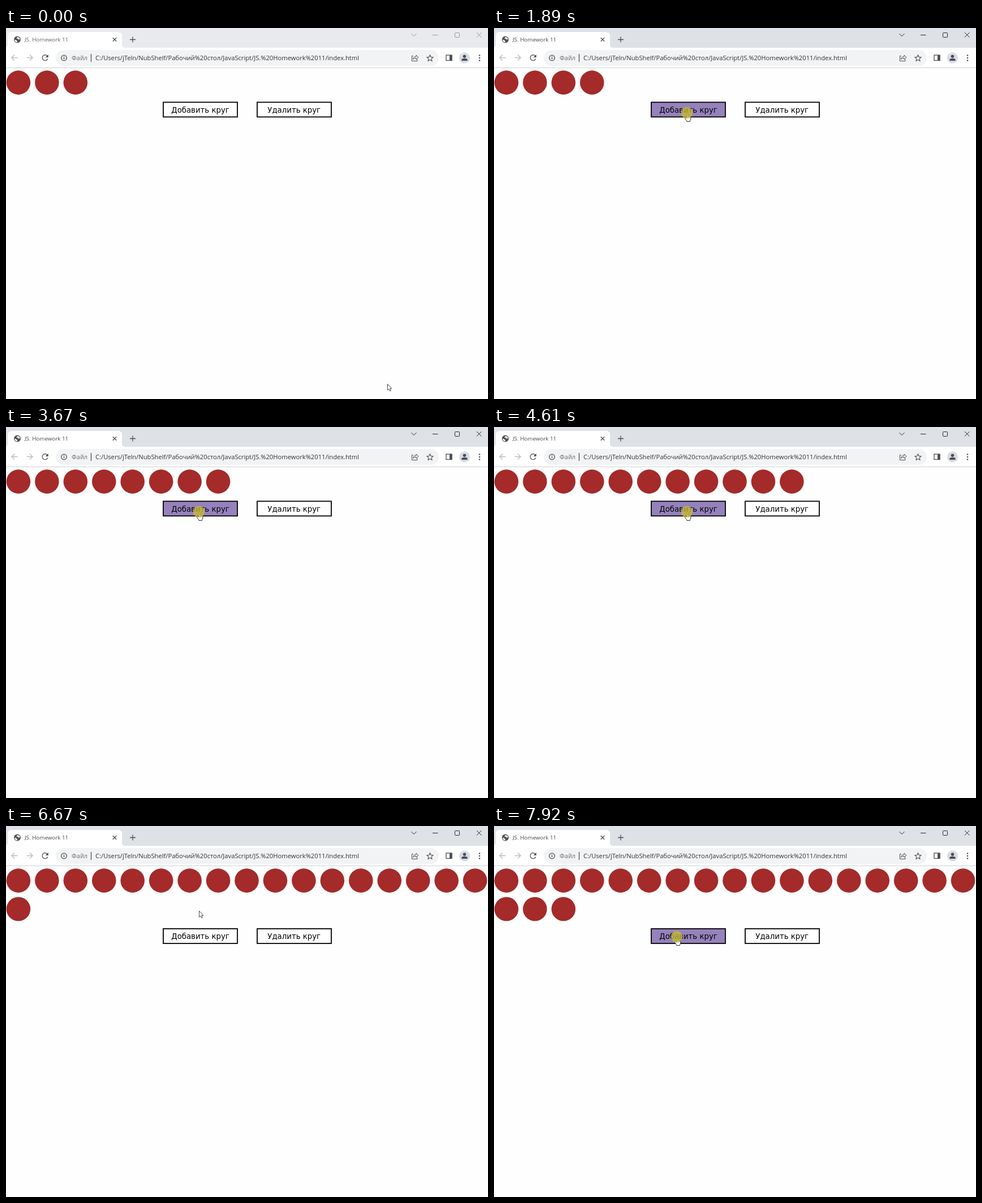
Animation, 852 px wide and 657 px high, one loop 7.99 s. Source, as an HTML page:

```html
<!DOCTYPE html>
<html lang="ru">
<head>
<meta charset="utf-8">
<title>JS. Homework 11</title>
<style>
  html, body { margin: 0; width: 100%; height: 100%; overflow: hidden; background: #fefefe; }
  svg { display: block; width: 852px; height: 657px; }
  text { font-family: "Open Sans", "Noto Sans", sans-serif; fill: #303236; white-space: pre; }
  .line { fill: none; stroke: #4b4e53; stroke-width: 1.3; }
  .pale { stroke: #b9bbbf; }
  .bar { fill: #dee1e6; }
  .win { fill: none; stroke: #25272a; stroke-width: 1; }
  .tab { font-size: 9.8px; fill: #45484d; }
  .inactive .bar { fill: #e8eaed; }
  .inactive .win { stroke: #96989c; }
  .inactive .tab { fill: #62656a; }
  .btn rect { fill: #fff; stroke: #000; stroke-width: 1.8; }
  .btn text { font: 13.3px "DejaVu Sans", Verdana, sans-serif; fill: #000; text-anchor: middle; }
  .btn.hover rect { fill: #9582bd; }
  #dots { fill: #a52a2a; }
</style>
</head>
<body>
<svg id="stage" viewBox="0 0 852 657">
  <rect width="852" height="657" fill="#fefefe"/>

  <!-- title bar -->
  <rect class="bar" width="852" height="35"/>
  <path d="M-3 35Q3 35 3 29V14Q3 7 10 7H198Q205 7 205 14V29Q205 35 211 35Z" fill="#fff"/>
  <circle cx="20" cy="20.5" r="5.9" fill="#505357"/>
  <path d="M15.5 20.5L18 21.5 20 23.5 19.5 25.5Q15.5 25 15.5 20.5ZM20 16L23.5 17 24.7 20 22 20.5 20.5 18.7 18.5 19Z" fill="#fff"/>
  <text class="tab" x="33" y="24">JS. Homework 11</text>
  <path class="line" d="M188.7 17.2l6.6 6.6m0-6.6l-6.6 6.6"/>
  <path class="line" stroke-width="1.6" d="M219 20.5h10m-5-5v10"/>
  <g class="win">
    <path d="M716.5 10l4.5 4.5 4.5-4.5M754 12.5h9.5M832 8l8.5 8.5m0-8.5L832 16.5"/>
    <rect x="793.5" y="8.5" width="8" height="8" rx="1"/>
  </g>

  <!-- toolbar -->
  <rect y="35" width="852" height="35.5" fill="#fff"/>
  <rect y="70" width="852" height="1" fill="#cfd0d2"/>
  <rect x="88" y="39" width="677" height="28" rx="14" fill="#f1f3f4"/>
  <path class="line pale" d="M20.5 52.5H10m5-5l-5 5 5 5M36.500 52.500H47m-5-5l5 5-5 5"/>
  <path class="line" d="M73 49.500A5 5 0 1 0 73.800 54.500"/>
  <path d="M74.700 47v5h-5z" fill="#4b4e53"/>
  <circle class="line" cx="102.500" cy="53" r="4.800"/>
  <path class="line" d="M102.500 52.300v3.300M102.500 50.100v1.300"/>
  <text x="116" y="57" font-size="11" style="fill:#6a6d72">Файл</text>
  <path class="line" stroke-width="1" d="M150.500 46v14"/>
  <text x="158" y="57" font-size="11.200">C:/Users/jTeln/NubShelf/Рабочий%20стол/JavaScript/JS.%20Homework%2011/index.html</text>
  <path class="line" style="stroke-width:1" d="M720 49.500h-2.500v9h9.500v-3M719.500 55.500q.500-5 5.500-5v-2.500l4 4-4 3.700v-2.500q-3.500 0-5.500 2.300z"/>
  <path class="line" style="stroke-width:1.100" d="M749.500 47.800l1.600 3.600 3.900.400-2.900 2.600.800 3.900-3.400-2-3.400 2 .800-3.900-2.900-2.600 3.900-.400z"/>
  <rect class="line" x="778" y="48" width="10" height="9.500"/>
  <rect x="784" y="48" width="4.500" height="9.500" fill="#4b4e53"/>
  <circle cx="810.500" cy="53" r="9.500" fill="#dadce3"/>
  <g fill="#4a4e5c">
    <circle cx="810.500" cy="50.300" r="2.700"/>
    <path d="M805.300 58v-1.500q0-2.700 5.200-2.700t5.200 2.700V58z"/>
  </g>
  <g fill="#4b4e53">
    <circle cx="837" cy="48.500" r="1.300"/><circle cx="837" cy="53" r="1.300"/><circle cx="837" cy="57.500" r="1.300"/>
  </g>

  <!-- page -->
  <g id="dots"></g>
  <g id="buttons">
    <g class="btn" id="add"><rect x="278" y="131.500" width="131" height="26"/><text x="343.500" y="150">Добавить круг</text></g>
    <g class="btn"><rect x="444" y="131.500" width="131" height="26"/><text x="509.200" y="150">Удалить круг</text></g>
  </g>

  <g id="cursor" fill="#fff" stroke-linejoin="round">
    <path id="arrow" stroke="#34344c" stroke-width=".9" d="M.5 .5V11.300L2.900 9.200 4.600 13 6.400 12.200 4.800 8.400H7.800Z"/>
    <g id="hand" stroke="#16161c" stroke-width=".9">
      <path d="M-.5 9.500V1.500Q-.5 .3 .6 .3T1.700 1.500V5.600Q2.300 4.900 3.500 5.800 4.400 5.300 5.200 6.300 6.800 6 6.800 7.600V11Q6.800 13 5.500 14.200V15.600H-.2V14.300L-3.600 10.200Q-4.200 8.700-3 8.200-2.100 8-.5 9.500Z"/>
      <path stroke-width=".6" d="M1.700 5.600v3M3.500 5.900v2.800M5.200 6.400v2.500"/>
    </g>
    <circle id="press" r="10.300" fill="#c8ba35" fill-opacity=".76"/>
  </g>
</svg>

<script>
const LOOP = 7990, PER_ROW = 17, PITCH = 50.45, FOCUS = 1630;

// [press, release, moment the circle appears (default: release)]
const clicks = [
  [1630, 1950, 1890], [2280, 2350], [2690, 2760], [3020, 3270, 3020],
  [3330, 3400], [3670, 3730], [3930, 4060], [4260, 4330], [4610, 4660],
  [4930, 4990], [5260, 5340], [5520, 5590], [5860, 5940], [6200, 6270],
  [6620, 6670], [7330, 7390], [7590, 7660], [7920, 8000]
];

const moves = [
  { start: 70, end: 790, steps: 12, from: [674, 630], via: [790, 340], to: [396, 202] },
  { start: 880, end: 1220, steps: 6, from: [396, 202], via: [362, 172], to: [341, 150] },
  { start: 6870, end: 7260, steps: 7, from: [341, 150], via: [335, 178], to: [323, 196] }
];

const $ = id => document.getElementById(id);
const show = (el, on) => el.setAttribute('visibility', on ? 'visible' : 'hidden');
const shift = (el, x, y) => el.setAttribute('transform', `translate(${x} ${y})`);

const dots = Array.from({ length: 3 + clicks.length }, (_, i) => {
  const dot = document.createElementNS('http://www.w3.org/2000/svg', 'circle');
  dot.setAttribute('cx', 21.9 + PITCH * (i % PER_ROW));
  dot.setAttribute('cy', 96.600 + PITCH * Math.floor(i / PER_ROW));
  dot.setAttribute('r', 21.300);
  return $('dots').appendChild(dot);
});

function pointer(t) {
  const m = moves.filter(m => t >= m.start).pop();
  if (!m) return moves[0].from;
  const gap = (m.end - m.start) / (m.steps - 1);
  const p = Math.min(1, (Math.floor((t - m.start) / gap + 1e-6) + 1) / m.steps);
  const e = p * p * (3 - 2 * p), r = 1 - e;
  return [0, 1].map(k => r * r * m.from[k] + 2 * r * e * m.via[k] + e * e * m.to[k]);
}

function draw(t) {
  const count = 3 + clicks.filter(([, up, add = up]) => t >= add).length;
  const drop = count > PER_ROW ? PITCH : 0;
  const [x, y] = pointer(t);
  const over = x > 277 && x < 410 && y > 130.5 + drop && y < 158.5 + drop;

  $('stage').classList.toggle('inactive', t < FOCUS);
  dots.forEach((dot, i) => show(dot, i < count));
  shift($('buttons'), 0, drop);
  $('add').classList.toggle('hover', over);
  shift($('cursor'), x, y);
  show($('arrow'), !over);
  show($('hand'), over);
  show($('press'), clicks.some(([down, up]) => t >= down && t < up));
}

const origin = performance.now();
function tick() {
  draw((performance.now() - origin) % LOOP);
  requestAnimationFrame(tick);
}
tick();
</script>
</body>
</html>
```
